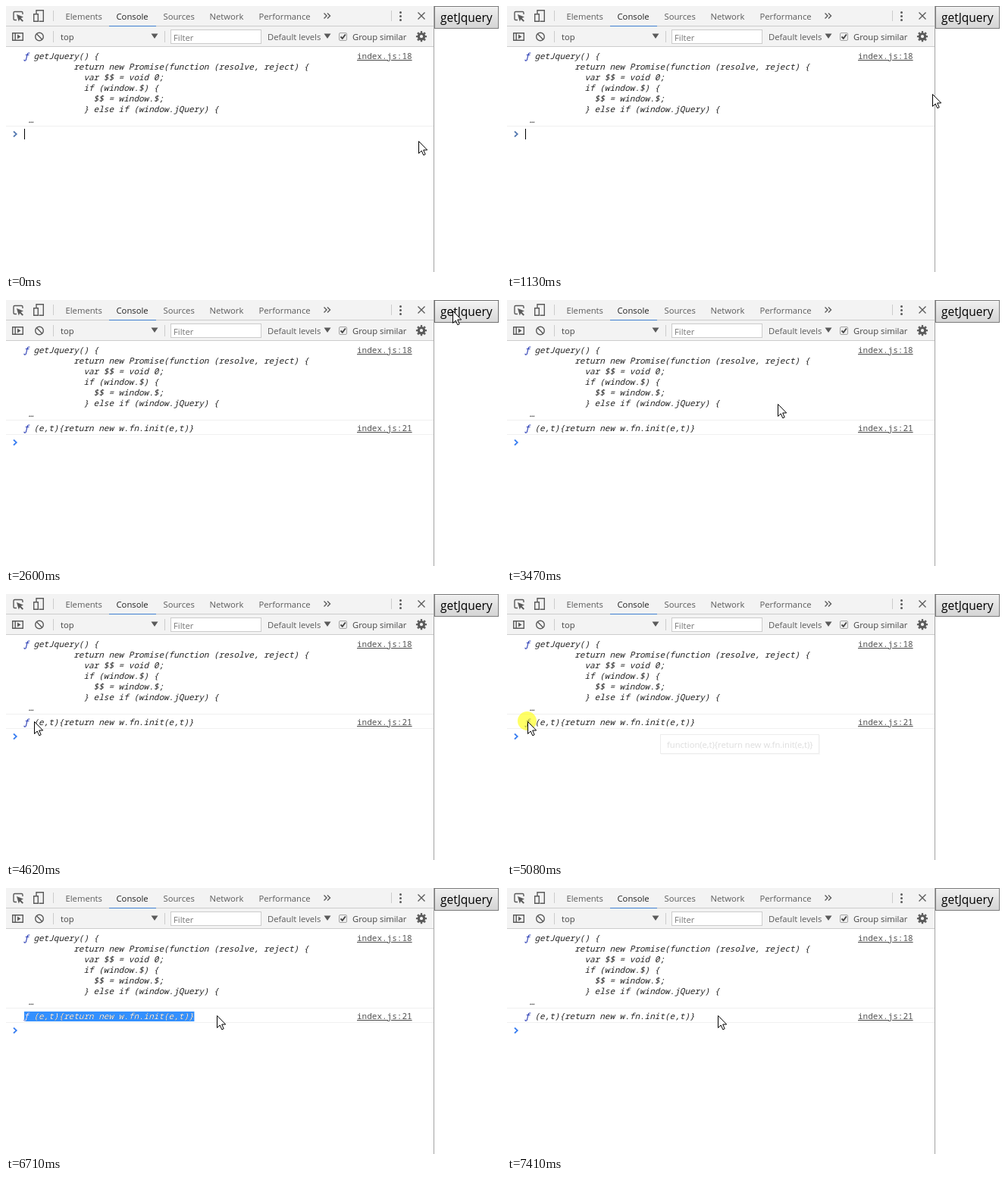
An HTML page that plays this animation: 653x351 px, repeating every 8.97 s.

```html
<!DOCTYPE html>
<html lang="en">
<head>
<meta charset="utf-8">
<title>Console demo</title>
<style>
html, body { margin: 0; width: 100%; height: 100%; overflow: hidden; background: #fff; }
svg { display: block; width: 653px; height: 351px; }
text { font: 11.25px "Open Sans", "Noto Sans", sans-serif; fill: #5a5a5a; white-space: pre; }
.code, .link { font: 11px "Noto Sans Mono", "Liberation Mono", monospace; }
.code { font-style: italic; fill: #222; }
.fn { fill: #0d22aa; }
.white .code, .white .fn { fill: #fff; }
.link { fill: #545454; text-decoration: underline; }
.icon { fill: none; stroke: #5a5a5a; stroke-width: 1.4; }
.solid { fill: #5a5a5a; }
.rule { fill: none; stroke: #ccc; }
.row { fill: none; stroke: #f0f0f0; }
</style>
</head>
<body>
<svg id="stage" viewBox="0 0 653 351" xmlns="http://www.w3.org/2000/svg">
  <defs>
    <linearGradient id="face" x2="0" y2="1">
      <stop id="faceTop" stop-color="#f0f0f0"/>
      <stop id="faceEnd" offset="1" stop-color="#d4d4d4"/>
    </linearGradient>
    <clipPath id="selClip"><rect id="selClipBox" x="24" y="163" width="0" height="13"/></clipPath>
  </defs>

  <rect width="564" height="53" fill="#f3f3f3"/>
  <path class="rule" d="M0 26.5H564M0 53.5H564M62.5 6V20M508.5 6V20M62.5 33V48M209.5 33V48"/>
  <rect x="136" y="26" width="62" height="1" fill="#3f7fd0"/>
  <path d="M564.5 0V351" stroke="#a3a3a3"/>
  <path class="row" d="M0 158.5H564"/>

  <!-- top toolbar icons -->
  <path class="icon" d="M14 18.5H11.5Q10 18.5 10 17V9Q10 7.5 11.5 7.5H20.5Q22 7.5 22 9V11"/>
  <path class="solid" d="M14 11L23 14.5L19.6 16L23 19.4L21.6 20.8L18.2 17.4L16.8 20.5Z"/>
  <path class="icon" d="M40 10V5.7H49.3V20.3H43.5M36.7 10.7H42.3V20.3H36.7Z"/>
  <path class="icon" d="M419.5 9.5L423 13L419.5 16.5M424 9.5L427.5 13L424 16.5"/>
  <g class="solid"><circle cx="520.5" cy="8.5" r="1.5"/><circle cx="520.5" cy="13.5" r="1.5"/><circle cx="520.5" cy="18.5" r="1.5"/></g>
  <path class="icon" d="M543.5 8.5L552.5 17.5M552.5 8.5L543.5 17.5"/>

  <!-- second toolbar -->
  <path class="icon" d="M8.7 35.7H22.3V45.3H8.7ZM12.2 35.7V45.3"/>
  <path class="solid" d="M15 37.5L19.5 40.5L15 43.5Z"/>
  <circle class="icon" cx="44" cy="40.5" r="5.3"/>
  <path class="icon" d="M40.3 36.8L47.7 44.2"/>
  <path class="solid" d="M191.5 36.5H200.5L196 43ZM419.5 36.5H428.5L424 43Z"/>
  <rect x="217.5" y="31.5" width="119" height="18" fill="#fff" stroke="#ccc"/>
  <rect x="439.5" y="35.5" width="10" height="10" rx="1.5" fill="#eee" stroke="#a5a5a5"/>
  <path class="icon" style="stroke:#444;stroke-width:1.8" d="M441.5 40.5L443.8 42.8L447.8 37.5"/>
  <circle class="icon" cx="548" cy="40.2" r="3.7" style="stroke-width:3.2"/>
  <circle class="icon" cx="548" cy="40.2" r="6" style="stroke-width:2.2" pathLength="16" stroke-dasharray="1 1" stroke-dashoffset=".5"/>

  <g id="labels"></g>

  <g id="log"></g>
  <g id="result">
    <path class="row" d="M0 177.5H564"/>
    <rect id="sel" x="24" y="163" width="0" height="13" fill="#3390ff"/>
    <g id="resultText"></g>
  </g>
  <path id="prompt" d="M10 165.5L13.8 169L10 172.5" fill="none" stroke-width="1.7"/>
  <path id="caret" d="M24.5 162V176" stroke="#000"/>

  <rect id="button" x="565.5" y=".5" width="84" height="29" fill="url(#face)"/>
  <text x="573" y="21" style="font-size:15.5px;fill:#000">getJquery</text>

  <g id="tip">
    <rect x="203" y="186" width="210" height="26" fill="#000" opacity=".15"/>
    <rect x="202.5" y="185.5" width="209" height="25" fill="#fff" stroke="#aaa"/>
    <text x="211" y="203" style="font-size:11.2px">function(e,t){return new w.fn.init(e,t)}</text>
  </g>

  <g id="mouse">
    <circle id="press" cx="-.5" cy="-.5" r="12.5" fill="#ff0" opacity=".6"/>
    <path d="M.5 .5V16.5L4.2 13L6.8 18.8L9.2 17.7L6.7 12H11.7Z" fill="#fff" stroke="#000"/>
  </g>
</svg>
<script>
const LOOP = 8970, CHAR = 6.6, LEFT = 24;
const SLANT = 0.8; // the oblique glyphs lean right of their cells
const $ = id => document.getElementById(id);
const set = (id, attrs) => { for (const k in attrs) $(id).setAttribute(k, attrs[k]); };
const show = (id, on) => set(id, { visibility: on ? "visible" : "hidden" });
const within = (t, a, b) => t >= a && t < b;

const label = (x, y, s, fill = "#5a5a5a") => `<text x="${x}" y="${y}" style="fill:${fill}">${s}</text>`;
const code = (col, y, s) =>
  `<text class="code" x="${LEFT - SLANT + col * CHAR}" y="${y}">${s.replace("ƒ", '<tspan class="fn">ƒ</tspan>')}</text>`;
const link = (y, line) => `<text class="link" x="463" y="${y}">index.js:${line}</text>`;

$("labels").innerHTML = label(78.5, 18, "Elements") + label(145.5, 18, "Console", "#222") +
  label(207.5, 18, "Sources") + label(268.5, 18, "Network") + label(333.5, 18, "Performance") +
  label(72, 45, "top", "#444") + label(221, 46, "Filter", "#757575") +
  label(345, 45, "Default levels") + label(457, 45, "Group similar", "#444");

const source = [
  [0, "ƒ getJquery() {"],
  [10, "return new Promise(function (resolve, reject) {"],
  [12, "var $$ = void 0;"],
  [12, "if (window.$) {"],
  [14, "$$ = window.$;"],
  [12, "} else if (window.jQuery) {"],
  [1, "…"]
];
$("log").innerHTML = source.map(([col, s], i) => code(col, 70 + 14 * i, s)).join("") + link(70, 18);

const output = "ƒ (e,t){return new w.fn.init(e,t)}";
const outputText = code(0, 173, output);
$("resultText").innerHTML = outputText + link(173, 21) +
  `<g class="white" clip-path="url(#selClip)">${outputText}</g>`;

const smooth = k => k * k * (3 - 2 * k);
const out = n => k => 1 - (1 - k) ** n;
const glide = k => (k + smooth(k)) / 2;

// Each move is sampled in 12 steps; lead is the step already taken at its start.
const moves = [
  { from: 830, to: 1670, a: [544, 178], b: [589, 14], lead: 1, ease: [smooth, smooth] },
  { from: 3230, to: 4090, a: [589, 14], b: [182, 177], lead: 1, ease: [out(2.08), out(3.45)] },
  { from: 4160, to: 5010, a: [182, 177], b: [27, 168], lead: 1, ease: [out(3.14), out(4)] },
  { from: 5080, to: 5930, a: [27, 168], b: [278, 168], lead: 0, ease: [glide, glide] }
];

function mouseAt(t) {
  const m = moves.filter(m => t >= m.from).pop();
  if (!m) return moves[0].a;
  const step = Math.min(11, Math.floor((t - m.from + 5) / ((m.to - m.from) / 11)));
  const k = (step + m.lead) / (11 + m.lead);
  return m.a.map((v, i) => Math.round(v + (m.b[i] - v) * m.ease[i](k)));
}

function tipAlpha(t) {
  if (!within(t, 4700, 5160)) return 0;
  if (t < 4780) return 0.5;
  return t < 5010 ? 1 : t < 5080 ? 0.5 : 0.2;
}

function draw(t) {
  const [x, y] = mouseAt(t);
  set("mouse", { transform: `translate(${x} ${y})` });
  const clicking = within(t, 2450, 2525);
  show("press", clicking || within(t, 5010, 6710) || within(t, 7340, 7410));

  const hover = x >= 566 && x < 650 && y < 30;
  const [top, end] = clicking ? ["#e4e4e4", "#cacaca"] : hover ? ["#f4f4f4", "#d8d8d8"] : ["#f0f0f0", "#d4d4d4"];
  set("faceTop", { "stop-color": top });
  set("faceEnd", { "stop-color": end });
  set("button", { stroke: hover ? "#707070" : "#7c7c7c" });

  const done = t >= 2600;
  show("result", done);
  set("prompt", {
    transform: `translate(0 ${done ? 19 : 0})`,
    stroke: t < 2450 ? "#5378b0" : "#367cf1"
  });
  show("caret", t < 370 || within(t, 906, 1441) || within(t, 1900, 2450));

  const chars = within(t, 5080, 7340) ? Math.min(output.length, Math.floor((x - LEFT) / CHAR)) : 0;
  set("sel", { width: chars * CHAR });
  set("selClipBox", { width: chars * CHAR });
  set("tip", { opacity: tipAlpha(t) });
}

const start = performance.now();
function tick() {
  draw((performance.now() - start) % LOOP);
  requestAnimationFrame(tick);
}
tick();
</script>
</body>
</html>
```
